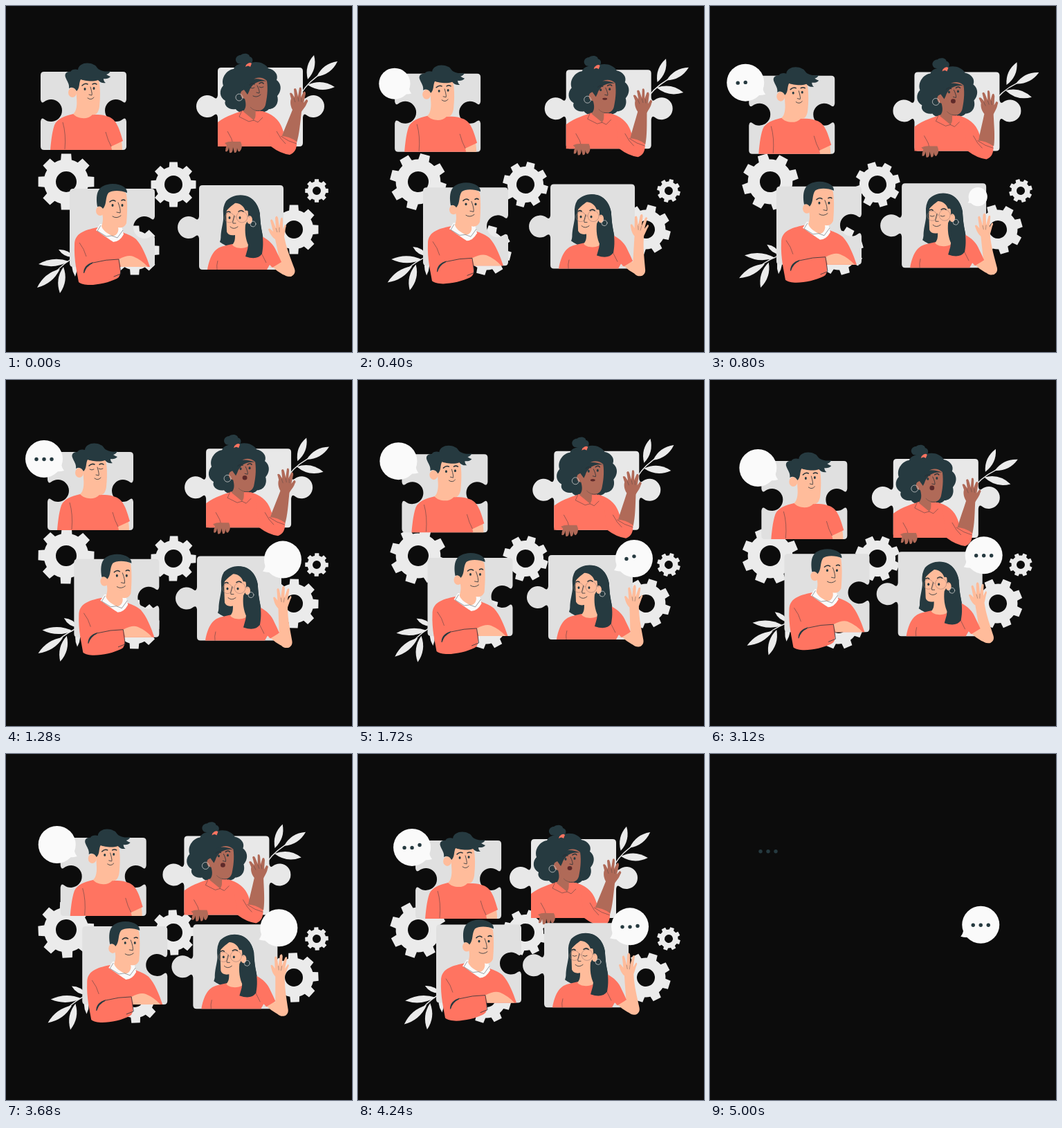
Write an HTML page that moves like this. It is 500 by 500 pixels and loops after 5040 ms.

```html
<!DOCTYPE html>
<html lang="en">
<head>
<meta charset="utf-8">
<title>Puzzle team</title>
<style>
html, body { margin: 0; width: 100%; height: 100%; overflow: hidden; background: #0c0c0c; }
svg { display: block; width: 100vw; height: 100vh; }
.ink { fill: #263a40; }
.red { fill: #ff7461; }
.skin { fill: #ffbc9b; }
.brown { fill: #b06a58; }
.lips { fill: #5e2a2a; }
.pale { fill: #ebebeb; }
.white { fill: #fafafa; }
.line, .stem, .ring { fill: none; stroke: #263238; stroke-width: .8; stroke-linecap: round; stroke-linejoin: round; }
.fold { fill: none; stroke: #263238; stroke-width: .6; opacity: .75; }
.soft { fill: none; stroke: #263238; stroke-width: .8; opacity: .4; }
.brow { stroke-width: 1.5; }
.stem { stroke: #ebebeb; stroke-width: 1.4; }
.ring { stroke: #ccc; }
</style>
</head>
<body>
<svg id="stage" viewBox="0 0 500 500"></svg>
<script>
const LOOP = 5040, END = 4990, TAU = Math.PI * 2;
const stage = document.getElementById('stage');

const path = (cls, d) => `<path class="${cls}" d="${d}"/>`;
const oval = (cls, x, y, rx, ry = rx) => `<ellipse class="${cls}" cx="${x}" cy="${y}" rx="${rx}" ry="${ry}"/>`;
const group = (id, body) => `<g id="${id}">${body}</g>`;

function gear(id, x, y, r, hole) {
  const base = r * .79;
  const at = (deg, rad) => {
    const a = deg * Math.PI / 180;
    return `${(rad * Math.sin(a)).toFixed(2)} ${(-rad * Math.cos(a)).toFixed(2)}`;
  };
  let d = '';
  for (let a = 0; a < 360; a += 45) {
    d += `${a ? 'L' : 'M'}${at(a - 14, base)}L${at(a - 10, r)}L${at(a + 10, r)}L${at(a + 14, base)}`;
    d += `A${base} ${base} 0 0 1 ${at(a + 31, base)}`;
  }
  d += `ZM${-hole} 0a${hole} ${hole} 0 1 0 ${hole * 2} 0a${hole} ${hole} 0 1 0 ${-hole * 2} 0Z`;
  return `<g transform="translate(${x} ${y})">${group(id, `<path class="pale" fill-rule="evenodd" d="${d}"/>`)}</g>`;
}

// Sides: 1 is a tab, -1 a notch, 0 a straight edge.
function piece(x, y, w, h, cy, left, right, fill = '#e0e0e0') {
  const R = x + w, B = y + h;
  const knob = (edge, out, down) => {
    const px = n => edge + out * n, py = n => cy + down * n;
    const sweep = out * down > 0 ? 1 : 0;
    return `L${edge} ${py(-16)}Q${px(1)} ${py(-9.5)} ${px(5)} ${py(-12.5)}
      A16 16 0 1 ${sweep} ${px(5)} ${py(12.5)}Q${px(1)} ${py(9.5)} ${edge} ${py(16)}`;
  };
  return `<path fill="${fill}" d="M${x + 5} ${y}H${R - 5}Q${R} ${y} ${R} ${y + 5}
    ${right ? knob(R, right, 1) : ''}V${B - 5}Q${R} ${B} ${R - 5} ${B}H${x + 5}Q${x} ${B} ${x} ${B - 5}
    ${left ? knob(x, -left, -1) : ''}V${y + 5}Q${x} ${y} ${x + 5} ${y}Z"/>`;
}

function leaf(x, y, tx, ty, w) {
  const mx = (x + tx) / 2, my = (y + ty) / 2, n = Math.hypot(tx - x, ty - y);
  const ox = -(ty - y) / n * w, oy = (tx - x) / n * w;
  return path('pale', `M${x} ${y}Q${mx + ox} ${my + oy} ${tx} ${ty}Q${mx - ox} ${my - oy} ${x} ${y}`);
}

function bubble(id, x, y, side) {
  const px = n => x + n * side;
  const tail = `M${px(25)} ${y + 6}Q${px(25)} ${y + 12} ${px(29)} ${y + 17}Q${px(22)} ${y + 19} ${px(17)} ${y + 18}Z`;
  const dots = [-11, 0, 11].map((dx, i) => group(`${id}Dot${i}`, oval('ink', x + dx, y + .5, 2.7)));
  return group(id, oval('white', x, y, 27) + path('white', tail)) + dots.join('');
}

const eyes = (id, x1, y1, x2, y2) =>
  group(id, oval('ink', x1, y1, 1.5, 1.9) + oval('ink', x2, y2, 1.5, 1.9)) +
  group(id + 'Shut', path('line', `M${x1 - 3} ${y1}q3 2 6 0M${x2 - 3} ${y2}q3 2 6 0`));

const curlyMan = piece(50, 95, 124, 113, 151, -1, -1) +
  path('skin', 'M152 202L167 195Q168 202 168 208H152Z') +
  path('red', 'M97 156C84 159 74 163 70 172C66 184 65 198 64 208H153L152 203L169 195C164 178 160 164 148 160C143 158 138 157 133 157Z') +
  path('skin', 'M101 106C103 98 131 96 134 106C137 120 136 135 135 145C134 155 129 158 125 157C118 165 103 163 97 156C102 152 103 143 102 133Z') +
  oval('skin', 96, 125, 6, 7) +
  path('ink', 'M91 119C92 112 88 109 86 103C84 98 88 94 93 95C95 91 101 91 104 92C105 83 118 80 127 85C131 86 131 90 135 92C141 95 146 95 151 94Q149 98 145 99Q148 101 151 102Q147 106 141 105Q141 109 144 111Q137 112 133 107C125 110 113 108 108 106C105 111 107 119 102 123C100 119 96 116 91 119Z') +
  path('line brow', 'M110 115q4 -4 8 -2M125 113q3 -2 6 0') +
  eyes('eyeA', 114, 120, 127, 119) +
  path('line', 'M122 117Q125 127 124 129L120 128M118 133Q123 137 127 132') +
  path('fold', 'M82 168Q87 185 85 207M144 182Q147 194 152 203');

const afroArm = path('brown', 'M398 190C403 176 409 163 414 150C410 143 411 136 412 134L410 126Q413 124 415 129L417 132L416 120Q419 117 420 122L422 131L424 118Q427 116 427 121L426 132L430 124Q433 122 433 127L430 140L434 135Q438 136 435 140C433 146 429 149 427 153C425 170 424 185 420 198Z') +
  path('soft', 'M416 133L418 139M422 132L423 138M427 133L427 139');

const afroWoman = piece(306, 89, 123, 114, 145, 1, 1, '#e8e8e8') +
  path('ink', 'M314 115C310 103 320 92 329 91C332 83 344 82 350 84C359 78 374 81 379 90C389 92 394 100 391 107C400 114 397 125 392 130C395 140 389 149 380 149C374 156 360 154 354 153C345 156 335 154 332 149C323 151 314 144 317 137C308 132 308 121 314 115Z') +
  path('ink', 'M335 83C329 78 333 71 339 71C344 67 352 69 352 73C359 75 357 83 351 86Z') +
  path('red', 'M347 85Q352 80 355 83L353 88Q350 85 346 88Z') +
  path('red', 'M306 203V168C319 158 335 154 343 151L371 152C386 157 396 164 401 182L396 203Z') +
  path('brown', 'M350 118C352 106 366 98 377 108C379 121 377 134 375 143C373 150 367 152 361 151C360 155 362 160 358 166C351 163 345 159 341 154C348 148 347 141 345 134C338 134 337 124 342 122Z') +
  path('ink', 'M344 121C344 108 358 100 377 109C365 107 355 112 351 124L349 128Z') +
  path('soft', 'M353 146Q358 152 367 151') +
  path('red', 'M341 151L337 160L351 167L358 165ZM358 165L367 151L372 162L364 168Z') +
  path('fold', 'M341 151L337 160L351 167L358 165L364 168L371 161M320 181Q327 191 329 203') +
  '<circle class="ring" cx="337" cy="132" r="5"/>' +
  path('line brow', 'M352 114q4 -4 7 -1M366 112q4 -3 6 0') +
  eyes('eyeB', 356, 118, 369, 117) +
  path('line', 'M363 115Q367 123 366 126L362 125') +
  group('smile', path('line', 'M357 130Q363 133 368 128')) +
  group('mouth', oval('lips', 0, 0, 3.4)) +
  group('armB', afroArm) +
  path('red', 'M377 161Q395 166 397 188Q409 188 420 196Q421 211 410 215Q396 213 383 203Z') +
  path('fold', 'M397 188Q408 196 420 199M391 181Q397 193 404 199') +
  path('brown', 'M316 198Q322 195 330 196L339 196Q343 204 338 210Q335 212 334 205Q334 213 330 212L328 204Q328 214 323 212L322 204Q321 212 317 210Q317 205 319 201Z');

const sweaterMan = piece(92, 264, 123, 113, 320, 0, -1) +
  path('red', 'M132 320C112 324 99 329 99 345C98 368 103 386 105 399C114 407 144 402 160 394Q167 391 165 377H208C203 362 197 347 188 337C181 331 173 329 166 326Z') +
  path('white', 'M136 315L130 324Q149 337 155 341Q164 341 170 330L167 318Z') +
  path('skin', 'M140 278C143 264 172 264 174 272C176 286 175 305 174 314C171 320 167 321 162 320C164 327 158 334 153 332C145 328 139 323 138 318C141 311 140 304 139 300Z') +
  oval('skin', 136, 296, 6, 7) +
  path('ink', 'M132 290C129 271 132 258 154 257C168 257 176 264 175 270C166 266 153 266 148 270C143 277 146 287 140 293Q137 288 132 290Z') +
  path('line brow', 'M150 283q4 -4 8 -1M167 281q3 -2 5 0') +
  eyes('eyeC', 154, 288, 168, 288) +
  path('line', 'M162 284Q166 294 165 299L160 298M154 304Q160 308 166 303') +
  path('fold', 'M137 317L132 325L145 333L153 332L161 335L169 324M106 342Q113 351 116 362') +
  path('skin', 'M163 366Q176 359 184 362Q196 367 205 377H166Z') +
  path('ink', 'M112 386Q112 374 126 370L125 372Q116 376 113 386Z') +
  path('line', 'M126 371Q145 366 163 366L166 387L156 391');

const waveArm = path('skin', 'M389 337C383 333 381 327 379 323Q380 320 383 323L386 326L382 310Q384 306 386 311L390 321L389 306Q391 301 393 306L395 320L397 307Q400 304 400 309L400 323L403 316Q406 316 404 321L402 333C405 350 412 366 417 380C420 389 410 394 403 389C399 384 397 376 396 370Z') +
  path('soft', 'M390 321l2 6M395 320l0 7');

const glassesWoman = piece(279, 259, 122, 122, 320, 1, 0) +
  path('ink', 'M318 282C329 270 352 270 361 285C370 299 366 312 370 327C373 342 375 351 370 360Q361 366 345 362L312 343C307 330 316 312 314 301Q313 290 318 282Z') +
  path('skin', 'M381 378L394 370L410 377Q418 386 412 391Q400 391 385 377Z') +
  group('armD', waveArm) +
  path('red', 'M291 381C294 364 300 350 314 347L327 344L350 346L370 333C380 338 387 345 391 355Q395 363 398 370L385 378L381 374L377 381Z') +
  path('skin', 'M319 293C323 283 340 280 346 296C350 294 354 300 351 307L346 316C345 326 346 338 351 347C342 352 330 350 327 345C331 341 331 336 331 331C320 333 317 326 317 315Z') +
  path('ink', 'M318 297C323 289 334 285 335 279C346 280 350 291 350 301L349 313Q354 340 346 362Q363 368 370 358C375 334 366 317 367 300C364 282 352 274 340 274C324 274 315 284 314 300Q317 318 309 341Q315 345 318 344Q320 336 319 326Z') +
  oval('skin', 352, 309, 4, 6) +
  '<g fill="none" stroke="#a08078" stroke-width=".6"><circle cx="323" cy="306" r="7"/><circle cx="341" cy="305" r="8"/><path d="M330 305q2 -1 3 0M349 304l4 1"/></g>' +
  '<circle class="ring" cx="357" cy="315" r="4"/>' +
  path('line brow', 'M319 298q3 -2 5 0M336 297q4 -3 7 0') +
  eyes('eyeD', 323, 306, 338, 306) +
  path('line', 'M330 303Q327 312 328 314L332 314M324 319Q329 324 335 319') +
  path('fold', 'M306 368Q304 375 305 381M369 357L376 371');

const sprigB = path('stem', 'M426 127Q437 108 461 94') +
  leaf(436, 106, 445, 71, 10) + leaf(449, 102, 479, 80, 10) + leaf(436, 114, 475, 117, 11);
const sprigC = path('stem', 'M102 361Q84 371 70 386') +
  leaf(91, 369, 47, 373, 10) + leaf(78, 380, 45, 407, 10) + leaf(83, 377, 78, 415, 10) +
  leaf(98, 363, 76, 352, 7) + leaf(98, 364, 100, 391, 7);

stage.innerHTML = group('scene',
  gear('gear0', 87, 254, 41, 15) + gear('gear1', 242, 258, 33, 13) + gear('gear2', 416, 323, 36, 13) +
  gear('gear3', 449, 267, 17, 6) + gear('gear4', 186, 353, 36, 13) +
  group('moveA', curlyMan) +
  group('moveB', group('sprigB', sprigB) + afroWoman) +
  group('moveC', group('sprigC', sprigC) + sweaterMan) +
  group('moveD', glassesWoman)) +
  group('talkA', bubble('bubA', 45, 105, 1)) + group('talkD', bubble('bubD', 403, 264, -1));

const el = {};
stage.querySelectorAll('[id]').forEach(n => el[n.id] = n);
const set = (id, value) => el[id].setAttribute('transform', value);
const show = (id, on) => el[id].style.display = on ? '' : 'none';
const clamp = v => Math.max(0, Math.min(1, v));

// Drift in px per second.
const drift = { A: [7.8, 7.05], B: [-13.2, 8], C: [4.95, -4.1], D: [-2.35, -3.45] };
// Pop: start and origin. Dots: first beat and period.
const talk = {
  A: { pop: 150, ox: 74, oy: 132, beat: 620, every: 1600 },
  D: { pop: 650, ox: 375, oy: 293, beat: 1440, every: 1150 }
};
// First blink and the gap to the next.
const blink = { A: [1250, 2300], B: [2520, 2600], C: [2250, 2600], D: [800, 1720] };

function talkTo(key, t, end) {
  const { pop, ox, oy, beat, every } = talk[key], id = 'bub' + key;
  const s = end ? 1 : clamp((t - pop) / 300);
  set(id, `translate(${ox} ${oy}) scale(${s}) translate(${-ox} ${-oy})`);
  show(id, s > 0 && !(end && key === 'A'));
  const p = t < beat ? -1 : (t - beat) % every;
  for (let i = 0; i < 3; i++) {
    const q = p - i * 170;
    show(`${id}Dot${i}`, end || (q >= 0 && p < 800));
    set(`${id}Dot${i}`, `translate(0 ${end ? 0 : -4 * Math.sin(Math.PI * clamp(q / 180))})`);
  }
}

function draw(t) {
  const end = t >= END, sec = t / 1000;
  show('scene', !end);
  for (const k in drift) {
    const shift = `translate(${drift[k][0] * sec} ${drift[k][1] * sec})`;
    set('move' + k, shift);
    if (talk[k]) {
      set('talk' + k, shift);
      talkTo(k, t, end);
    }
    const [first, gap] = blink[k];
    const shut = Math.abs(((t - first + gap * 4.5) % gap) - gap / 2) < 90;
    show('eye' + k, !shut);
    show(`eye${k}Shut`, shut);
  }
  for (let i = 0; i < 5; i++) set('gear' + i, `rotate(${36 * sec})`);
  const sway = 5.7 * (Math.cos(TAU * (t - 870) / 2200) + .8);
  set('sprigB', `rotate(${sway} 428 124)`);
  set('sprigC', `rotate(${sway} 100 363)`);
  set('armB', `rotate(${-5 * (1 - Math.cos(TAU * t / 1413))} 408 192)`);
  set('armD', `rotate(${8.5 * (1 - Math.cos(TAU * sec))} 406 378)`);
  const open = t > 300 ? .7 + .3 * Math.sin(t / 95) : 0;
  show('smile', !open);
  show('mouth', open);
  set('mouth', `translate(362 131) scale(1 ${open})`);
}

function tick(now) {
  draw(now % LOOP);
  requestAnimationFrame(tick);
}
draw(0);
requestAnimationFrame(tick);
</script>
</body>
</html>
```
